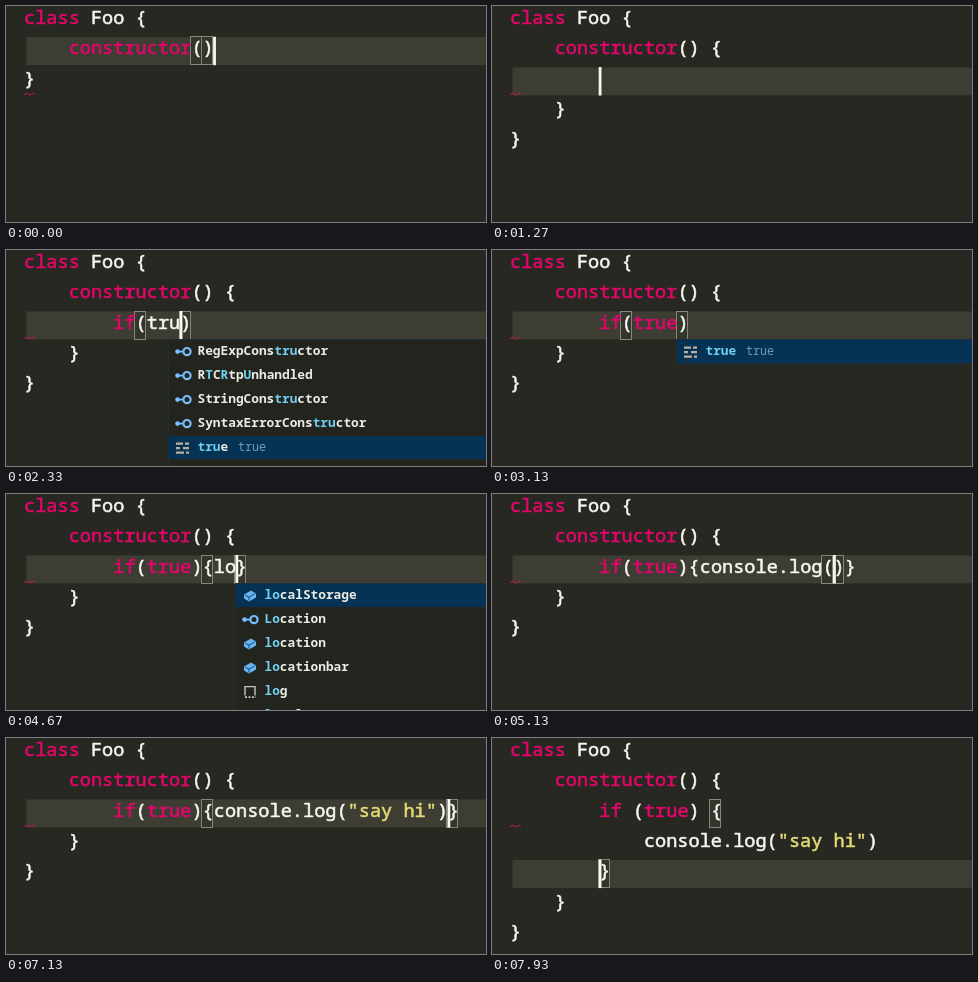
Animation of 480 by 216 pixels, one loop 8 s. Source, as an HTML page:

```html
<!DOCTYPE html>
<html lang="en">
<head>
<meta charset="utf-8">
<title>Typing a class</title>
<style>
html, body { margin: 0; width: 100%; height: 100%; overflow: hidden; background: #272822; }
svg { display: block; width: 480px; height: 216px; }
text { white-space: pre; font-family: "Noto Sans Mono", "DejaVu Sans Mono", monospace; color: #f8f8f2; }
text, tspan { fill: currentColor; stroke: currentColor; stroke-width: 0; }
.code, .code tspan { font-size: 18.6px; stroke-width: .55px; }
.key { color: #e4066c; }
.str { color: #e6db74; }
.item { font-size: 12.8px; font-weight: 600; color: #ecece6; }
.hit { color: #6fd0f0; }
.note { font-size: 11.7px; color: #6a9fc0; }
.pair { fill: #34352d; stroke: #85857c; }
</style>
</head>
<body>
<svg viewBox="0 0 480 216">
  <rect width="480" height="216" fill="#272822"/>
  <g id="editor"></g>
  <path d="M18 89 q1.9 -3 3.8 -1 t3.8 0 t3.2 0" fill="none" stroke="#c01c4a"/>
  <rect id="caret" width="2.8" height="28.5" fill="#f8f8f0"/>
  <g id="popup"></g>
</svg>
<script>
const LOOP = 8000, BLINK = 500;
const LEFT = 18, CHAR = 11.16, LINE = 30.3, ROW = 24;
const $ = id => document.getElementById(id);

// "|" marks the caret
const wrap = body => `class Foo {\n    ${body}\n}`;
const inner = body => wrap(`constructor() {\n        ${body}\n    }`);

const edits = [
  [0, wrap('constructor()|')],
  [500, wrap('constructor() |')],
  [930, wrap('constructor() {|}')],
  [1210, inner('|')],
  [1480, inner('i|')],
  [1660, inner('if|')],
  [1850, inner('if(|)')],
  [2050, inner('if(t|)')],
  [2160, inner('if(tr|)')],
  [2290, inner('if(tru|)')],
  [2550, inner('if(true|)')],
  [3310, inner('if(true)|')],
  [3800, inner('if(true){|}')],
  [4300, inner('if(true){l|}')],
  [4460, inner('if(true){lo|}')],
  [4780, inner('if(true){log|}')],
  [5000, inner('if(true){console.log(|)}')],
  [5400, inner('if(true){console.log("|")}')],
  [5860, inner('if(true){console.log("s|")}')],
  [5930, inner('if(true){console.log("sa|")}')],
  [6000, inner('if(true){console.log("say|")}')],
  [6080, inner('if(true){console.log("say |")}')],
  [6270, inner('if(true){console.log("say h|")}')],
  [6400, inner('if(true){console.log("say hi|")}')],
  [6660, inner('if(true){console.log("say hi"|)}')],
  [6870, inner('if(true){console.log("say hi")|}')],
  [7460, inner('if (true) {\n            console.log("say hi")\n        |}')]
];

// start, end, left, selected row, items as "icon label" with matches in brackets
const popups = [
  [1560, 1850, 118, 0, ['word [if]', 'snip [if]', 'snip [if]else', 'word [i]mport', 'word [i]n', 'word [i]nstanceof']],
  [2190, 2550, 163, 4, ['type RegExpCons[tru]ctor', 'type R[T]C[R]tp[U]nhandled', 'type StringCons[tru]ctor',
    'type SyntaxErrorCons[tru]ctor', 'word [tru]e', 'type TypeErrorCons[tru]ctor']],
  [2550, 3310, 185, 0, ['word [true]']],
  [4540, 4780, 230, 0, ['cube [lo]calStorage', 'type [Lo]cation', 'cube [lo]cation',
    'cube [lo]cationbar', 'snip [lo]g', 'cube [lo]calName']],
  [4780, 5000, 230, 0, ['snip [log]']]
];

const icons = {
  type: '<path d="M-5 0H2" stroke="#75beff" stroke-width="1.8"/><circle cx="-5.5" r="2.3" fill="#75beff"/>' +
    '<circle cx="4" r="3.6" fill="#22231d" stroke="#75beff" stroke-width="2.2"/>',
  cube: '<path d="M-6 -1 1 -5 6 -2V2L-1 6 -6 3Z" fill="#65b5f2"/>' +
    '<path d="M-5 -.5 -1 1.5 5 -2M-1 1.5V5" fill="none" stroke="#1d4a70"/>',
  word: '<path d="M-7 -4H0M2 -4H6M-7 .5H-3M0 .5H6M-7 5H1M3 5H6" stroke="#b9aea0" stroke-width="2.4"/>',
  snip: '<path d="M-5 4V-5H5V4" fill="none" stroke="#c5c5c0" stroke-width="1.4"/>' +
    '<path d="M-5 5.5H6" stroke="#c5c5c0" stroke-width="1.6" stroke-dasharray="2 1.5"/>'
};

const span = (cls, s) => `<tspan class="${cls}">${s}</tspan>`;
const paint = s => s.replace(/"[^"]*"|\b(?:class|constructor|if|true)\b/g,
  m => span(m[0] === '"' ? 'str' : 'key', m));

const place = (text, i) => {
  const before = text.slice(0, i).split('\n');
  return { row: before.length - 1, x: LEFT + before.pop().length * CHAR };
};

function matchAt(text, i) {
  const c = text[i], k = '(){}'.indexOf(c);
  if (!c || k < 0) return -1;
  const other = '(){}'[k ^ 1], step = k % 2 ? -1 : 1;
  for (let j = i, depth = 0; j >= 0 && j < text.length; j += step) {
    if (text[j] === c) depth++;
    if (text[j] === other && --depth === 0) return j;
  }
  return -1;
}

function pairFor(text, caret) {
  for (const i of [caret, caret - 1]) {
    const j = matchAt(text, i);
    if (j >= 0) return [i, j];
  }
  return [];
}

function drawEditor(marked) {
  const at = marked.indexOf('|'), text = marked.replace('|', '');
  const { row, x } = place(text, at);
  let out = `<rect x="20.5" y="${row * LINE + .9}" width="460" height="27.8" fill="#3e3d33"/>`;
  for (const i of pairFor(text, at)) {
    const p = place(text, i);
    out += `<rect class="pair" x="${Math.round(p.x - .7) - .5}" y="${Math.round(p.row * LINE) + .5}" width="11" height="28"/>`;
  }
  text.split('\n').forEach((s, i) => {
    out += `<text class="code" x="${LEFT}" y="${18.1 + i * LINE}">${paint(s)}</text>`;
  });
  $('editor').innerHTML = out;
  $('caret').setAttribute('x', x - .6);
  $('caret').setAttribute('y', row * LINE + .4);
}

function drawPopup(p) {
  if (!p) return $('popup').innerHTML = '';
  const [, , x, picked, items] = p;
  let out = `<rect x="${x - .5}" y="89.5" width="${481 - x}" height="${items.length * ROW}" fill="#23241e" stroke="#1b2f3a"/>`;
  items.forEach((item, i) => {
    const [icon, label] = item.split(' '), y = 90 + i * ROW;
    if (i === picked) out += `<rect x="${x}" y="${y}" width="${480 - x}" height="23" fill="#063253"/>`;
    out += `<g transform="translate(${x + 14} ${y + 11.6})">${icons[icon]}</g>`;
    out += `<text class="item" x="${x + 28.5}" y="${y + 14.7}">${label.replace(/\[(\w+)\]/g, (_, m) => span('hit', m))}</text>`;
    if (/^\[tru/.test(label)) out += `<text class="note" x="${x + 69}" y="${y + 14.7}">true</text>`;
  });
  $('popup').innerHTML = out;
}

let edit, popup = null;
function frame() {
  const t = performance.now() % LOOP;
  const e = edits.filter(k => k[0] <= t).pop();
  const p = popups.find(k => k[0] <= t && t < k[1]);
  if (e !== edit) drawEditor((edit = e)[1]);
  if (p !== popup) drawPopup(popup = p);
  $('caret').setAttribute('opacity', Math.floor((t - e[0]) / BLINK) % 2 ? 0 : 1);
  requestAnimationFrame(frame);
}
frame();
</script>
</body>
</html>
```
